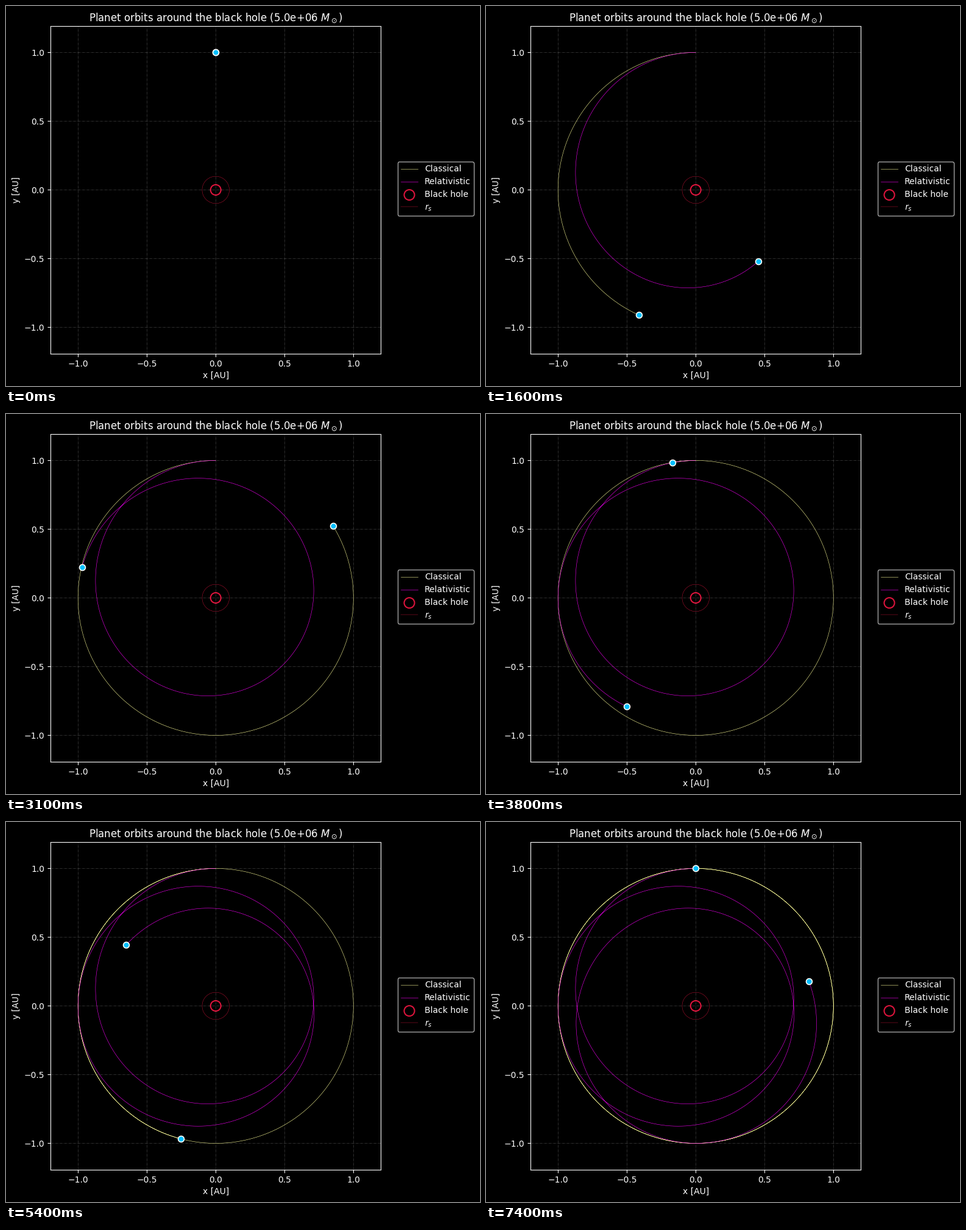
Animation, 778 px wide and 625 px high, one loop 7500 ms. Source, as a matplotlib script:

```python
import numpy as np
import matplotlib.pyplot as plt
from matplotlib.animation import FuncAnimation

W, H, DPI = 778, 625, 100
FRAMES, INTERVAL = 75, 100
SUB = 20                # integration steps per frame
RS = 0.0987             # Schwarzschild radius in AU
MASS = 5e6              # solar masses


def rates(s):
    """Geodesic motion with GM = L = 1; state is (r, dr/dt, angle)."""
    r, v, _ = s
    return np.array([v, 1 / r**3 - 1 / r**2 - 1.5 * RS / r**4, 1 / r**2])


def integrate(steps, dt):
    s = np.array([1.0, 0.0, 0.0])
    states = [s]
    for _ in range(steps):
        k1 = rates(s)
        k2 = rates(s + dt / 2 * k1)
        k3 = rates(s + dt / 2 * k2)
        k4 = rates(s + dt * k3)
        s = s + dt / 6 * (k1 + 2 * k2 + 2 * k3 + k4)
        states.append(s)
    return np.array(states)


def to_xy(r, angle):
    """Angle runs counter-clockwise from the +y axis."""
    return np.column_stack([-r * np.sin(angle), r * np.cos(angle)])


steps = (FRAMES - 1) * SUB
t = np.linspace(0, 4 * np.pi, steps + 1)
classical = to_xy(1.0, t)
states = integrate(steps, t[1])
relativistic = to_xy(states[:, 0], states[:, 2])

plt.style.use("dark_background")
plt.rcParams["font.family"] = "DejaVu Sans"
fig = plt.figure(figsize=(W / DPI, H / DPI), dpi=DPI)

left, bottom, width, height = 72.96, H - 571.95, 542.5, 539
ax = fig.add_axes([left / W, bottom / H, width / W, height / H])
half_y = 1.2 * height / width
ax.set(xlim=(-1.2, 1.2), ylim=(-half_y, half_y), xlabel="x [AU]", ylabel="y [AU]")
ax.set_title(rf"Planet orbits around the black hole ({MASS:.1e} $M_\odot$)")
ticks = np.linspace(-1, 1, 5)
ax.set_xticks(ticks)
ax.set_yticks(ticks)
ax.grid(color="white", ls="-.", lw=0.5, alpha=0.25)

trail_c, = ax.plot([], [], color="#ffff99", lw=0.4, label="Classical")
trail_r, = ax.plot([], [], color="magenta", lw=0.4, label="Relativistic")
hole = ax.scatter([0], [0], s=150, facecolor="none", edgecolor="crimson",
                  lw=1.5, label="Black hole")
ring = np.linspace(0, 2 * np.pi, 200)
horizon, = ax.plot(RS * np.cos(ring), RS * np.sin(ring), color="crimson",
                   lw=0.3, label="$r_s$")
planets = ax.scatter([0, 0], [1, 1], s=50, color="deepskyblue",
                     edgecolor="white", lw=1.2, zorder=5)

ax.legend(handles=[trail_c, trail_r, hole, horizon], loc="upper left",
          bbox_to_anchor=(1.05, 0.5864), borderaxespad=0)


def update(i):
    n = i * SUB
    trail_c.set_data(*classical[:n + 1].T)
    trail_r.set_data(*relativistic[:n + 1].T)
    planets.set_offsets([classical[n], relativistic[n]])
    return trail_c, trail_r, planets


anim = FuncAnimation(fig, update, frames=FRAMES, interval=INTERVAL,
                     repeat=True, repeat_delay=0)
plt.show()
```
